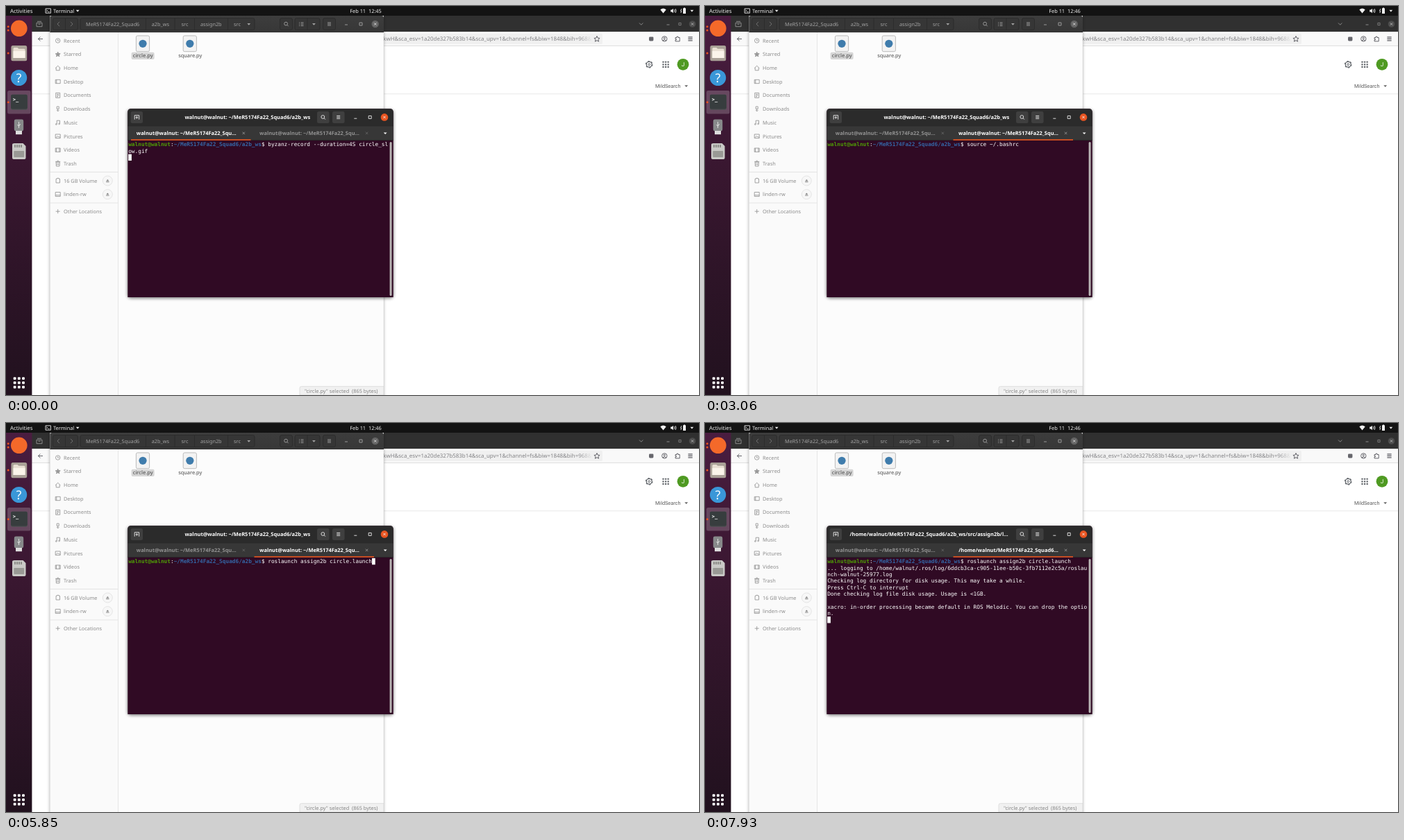
Animation, 998 px wide and 561 px high, one loop 8 s. Source, as an HTML page:

```html
<!DOCTYPE html>
<html lang="en">
<head>
<meta charset="utf-8">
<title>Desktop terminal</title>
<style>
html, body { margin: 0; width: 100%; height: 100%; overflow: hidden; background: #fff; }
svg { display: block; width: 998px; height: 561px; }
text { font: 7.4px "Noto Sans", "Open Sans", sans-serif; text-rendering: geometricPrecision; }
.mid text, text.mid { text-anchor: middle; }
.bar text { fill: #f0f0f0; }
.path text { fill: #a3a3a3; font-size: 7.3px; text-anchor: middle; }
.side text { fill: #8c8c8c; font-size: 7.35px; }
.line { fill: none; stroke-width: .9; }
.bold text { font-weight: 700; fill: #fff; font-size: 7.45px; text-anchor: middle; }
.term text { font: 7.771px "DejaVu Sans Mono", monospace; fill: #fff; }
.term .user { fill: #4e9a06; font-weight: 700; }
.term .dir { fill: #3465a4; font-weight: 700; }
</style>
</head>
<body>
<svg viewBox="0 0 998 561" xmlns="http://www.w3.org/2000/svg">
<defs>
  <linearGradient id="dock" x2="0" y2="1">
    <stop offset="0" stop-color="#4a1d40"/><stop offset=".4" stop-color="#391730"/><stop offset="1" stop-color="#21111e"/>
  </linearGradient>
  <linearGradient id="head" x2="0" y2="1">
    <stop offset="0" stop-color="#3d3d3d"/><stop offset="1" stop-color="#373737"/>
  </linearGradient>
  <linearGradient id="fade">
    <stop offset="0" stop-color="#f0f0f0" stop-opacity="0"/><stop offset="1" stop-color="#f0f0f0"/>
  </linearGradient>
  <filter id="soft" x="-10%" y="-10%" width="120%" height="120%"><feGaussianBlur stdDeviation="2.3"/></filter>
  <path id="down" d="M-2.4-1.2h4.8L0 1.5z"/>
  <path id="cross" d="M-1.7-1.7 1.7 1.7M1.7-1.7-1.7 1.7"/>
  <path id="menu" d="M-2.5-2h5M-2.5 0h5M-2.5 2h5"/>
  <path id="lens" d="M1.3 1.3 3.2 3.2M2-.4A2.4 2.4 0 1 1-2.8-.4 2.4 2.4 0 1 1 2-.4"/>
  <path id="min" d="M-2 2h4"/>
  <path id="max" d="M-2-2h4v4h-4z"/>
  <g id="grid"></g>
  <g id="eject"><circle r="7" fill="#f7f7f7" stroke="#dcdcdc" stroke-width=".7"/><path d="M-2.2.6 0-2 2.2.6zM-2.2 1.3h4.4v.9h-4.4z" fill="#858585"/></g>
  <g id="script"><rect x="-9.6" y="-11.4" width="19.2" height="22.8" rx="2" fill="#f3f3f3" stroke="#b5b5b5" stroke-width=".9"/><circle r="5.6" fill="#3f7cac"/></g>
</defs>

<!-- browser -->
<rect x="37" y="14" width="961" height="23.3" fill="#303030"/>
<rect x="37" y="37.3" width="961" height="20" fill="#f9f9f9"/>
<rect x="400" y="40" width="459" height="15" rx="2" fill="#f0f0f0"/>
<path d="M37 57.4H998" stroke="#d5d5d5" stroke-width=".8"/>
<path d="M37 126.8H998" stroke="#e9e9e9"/>
<text x="543.3" y="50.2" style="font-size:7.9px" fill="#818184">kwH&amp;sca_esv=1a20de327b583b14&amp;sca_upv=1&amp;channel=fs&amp;biw=1848&amp;bih=968&amp;</text>
<rect x="825" y="41" width="19" height="13" fill="url(#fade)"/>
<g class="line" stroke="#55555c">
  <path d="M53 47.5H46.6M49.4 44.5 46.4 47.5 49.4 50.5"/>
  <path d="M851 43.4 852.2 46.1 855.1 46.4 852.9 48.3 853.6 51.2 851 49.7 848.4 51.2 849.1 48.3 846.9 46.4 849.8 46.1z"/>
  <circle cx="948.3" cy="47.4" r="3.7"/><circle cx="948.3" cy="46.4" r="1.1"/><path d="M946 49.7q2.3-2 4.6 0"/>
  <path d="M964 45.5h2v-1.3h2v1.3h2.2v5.4H964v-2h1.3v-1.3H964z"/>
  <use href="#menu" transform="translate(985.5 47.4) scale(1.25)"/>
</g>
<rect x="926" y="44.4" width="6.4" height="6" rx="1.4" fill="#66666c"/>
<g class="line" stroke="#969696">
  <path d="M44 24.3h8v5.4h-8zM45 22.3h6M46.5 26.3h3"/>
  <path d="M912 24.5 914.7 27.2 917.4 24.5"/>
  <use href="#min" x="953.5" y="25"/><use href="#max" transform="translate(970.5 26) scale(.8)"/>
  <circle cx="988.5" cy="26" r="4.8" fill="#4c4c4c" stroke="none"/><use href="#cross" x="988.5" y="26" stroke="#bbb"/>
</g>
<g fill="none" stroke="#5f6368"><circle cx="926.2" cy="84.3" r="3.9" stroke-width="1.2"/><circle cx="926.2" cy="84.3" r="4.7" stroke-width="1.2" stroke-dasharray="2.4 2.52"/><circle cx="926.2" cy="84.3" r="1.4"/></g>
<use href="#grid" transform="translate(950 84.3) scale(.58)" fill="#5f6368"/>
<circle cx="975" cy="84.3" r="8.4" fill="#4f9a22"/>
<text class="mid" x="975" y="87.2" fill="#fff" style="font-family:Roboto,sans-serif;font-size:8.2px">J</text>
<text x="935" y="118" fill="#5a5a5a" style="font-family:Roboto,sans-serif;font-size:7.3px">MildSearch</text>
<use href="#down" x="979.7" y="115.4" fill="#666"/>

<!-- file manager -->
<rect x="62.5" y="15" width="482" height="552" opacity=".22" filter="url(#soft)"/>
<rect x="63.4" y="14" width="480.6" height="547" fill="#fcfcfc"/>
<rect x="63.4" y="38" width="98" height="523" fill="#fafafa"/>
<path d="M161.5 38V561M63.4 239.5h98M63.4 284h98" stroke="#e2e2e2" stroke-width=".9"/>
<path d="M63.2 38V561M544.2 38V561" stroke="#c6c6c6" stroke-width=".5"/>
<path d="M63.4 38V17q0-3 3-3h474.6q3 0 3 3v21z" fill="url(#head)"/>
<path d="M63.4 37.7H544" stroke="#262626" stroke-width=".5"/>
<g fill="#363636" stroke="#2a2a2a" stroke-width=".8">
  <rect x="67.5" y="17.5" width="36" height="17" rx="2.5"/><rect x="107" y="17.5" width="251" height="17" rx="2.5"/>
  <rect x="394.5" y="17.5" width="18" height="17" rx="2.5"/><rect x="416" y="17.5" width="36" height="17" rx="2.5"/>
  <rect x="456.5" y="17.5" width="18" height="17" rx="2.5"/>
  <path d="M85.5 17.5v17M201.5 17.5v17M243 17.5v17M271.5 17.5v17M319.5 17.5v17M434 17.5v17"/>
</g>
<g class="path">
  <text x="153.7" y="28.6">MeR5174Fa22_Squad6</text><text x="222.3" y="28.6">a2b_ws</text><text x="257.5" y="28.6">src</text>
  <text x="295.3" y="28.6">assign2b</text><text x="333" y="28.6">src</text>
</g>
<g fill="#a3a3a3"><use href="#down" x="349.7" y="26.2"/><use href="#down" x="443.4" y="26.2"/></g>
<g class="line" stroke="#a3a3a3">
  <path d="M77 22.8 74 26 77 29.2M93 22.8 96 26 93 29.2" stroke="#777"/>
  <use href="#lens" x="403.5" y="26"/><use href="#menu" x="465.5" y="26"/>
  <path d="M424.5 24h4M424.5 26.2h4M424.5 28.4h4M422 24h1M422 26.2h1M422 28.4h1"/>
  <use href="#min" x="490" y="25"/><use href="#max" x="511" y="26"/>
  <circle cx="531.7" cy="26" r="5.2" fill="#656565" stroke="none"/><use href="#cross" x="531.7" y="26" stroke="#e0e0e0"/>
</g>
<g class="side" id="side"></g>
<g class="line" stroke="#989898" stroke-width=".8">
  <circle cx="74.7" cy="50" r="3.2"/><path d="M74.7 48v2.2h1.6"/>
  <path d="M74.7 66.3 75.7 68.6 78.2 68.8 76.3 70.5 76.9 72.9 74.7 71.6 72.5 72.9 73.1 70.5 71.2 68.8 73.7 68.6z" fill="#989898"/>
  <path d="M71 89.8 74.7 86.2 78.4 89.8M72.2 89v3.8h5V89"/>
  <path d="M71.2 106.3h7v5.4h-7zM72.8 106.3v5.4"/>
  <path d="M71.7 125.3h6v7h-6zM73 127.3h3.4M73 129h3.4M73 130.7h2"/>
  <path d="M74.7 151.8v-3M73 150.2l1.7 1.8 1.7-1.8M73.2 148.5v-3.5h3v3.5z"/>
  <path d="M73.2 170.5v-5.3h4.3v4.5"/><circle cx="72.3" cy="170.5" r=".9"/><circle cx="76.6" cy="169.9" r=".9"/>
  <path d="M71.2 185h7v5.6h-7zM72 189.8l2-2.3 1.4 1.4 1-1 1.3 1.9"/>
  <path d="M71.2 205h7v5.4h-7zM72.6 205v5.4M76.8 205v5.4"/>
  <path d="M72 225.2h5.4l-.4 5.8h-4.6zM71.2 224.4h7M73.6 223.2h2.2M73.8 226.8v2.6M75.7 226.8v2.6"/>
  <path d="M72.1 249.4h1.2v-1h3v1h1.2v5.6h-5.4z"/><path d="M71.2 268.6h7v6h-7zM71.2 272.8h7"/>
  <path d="M71.7 296.2h6M74.7 293.2v6"/>
</g>
<use href="#eject" x="146.3" y="252"/><use href="#eject" x="146.3" y="271.6"/>
<use href="#script" x="197" y="54.3"/><use href="#script" x="264.8" y="54.3"/>
<rect x="180.6" y="66.7" width="33" height="10.4" rx="2" fill="#d6d6d6"/>
<g class="mid" fill="#484848"><text x="197.2" y="74.4" style="font-size:7.6px">circle.py</text><text x="265.2" y="74.4">square.py</text></g>
<path d="M423 561V551q0-2.3 2.3-2.3H544V561z" fill="#f1f1f1" stroke="#d8d8d8" stroke-width=".8"/>
<text x="430" y="557.8" fill="#858585" style="font-size:7.35px">"circle.py" selected&#160; (865 bytes)</text>

<!-- dock -->
<rect y="14" width="37.4" height="547" fill="url(#dock)"/>
<rect x="2" y="122" width="33.5" height="33.5" rx="2.5" fill="#fff" opacity=".2"/>
<g fill="#e95420"><circle cx="3.2" cy="29.8" r="1.5"/><circle cx="3.2" cy="35" r="1.5"/><circle cx="3.2" cy="68" r="1.5"/><circle cx="3.2" cy="138.8" r="1.5"/></g>
<circle cx="18.8" cy="32.3" r="11.8" fill="#f4692a"/>
<rect x="7.4" y="57" width="22.8" height="22.2" rx="2.5" fill="#aaa197"/>
<path d="M10.5 61.5q0-1.5 1.5-1.5h4.5l1.8 1.8H26q1.5 0 1.5 1.5V75h-17z" fill="#e9dfd3"/><path d="M10.5 65h17v10h-17z" fill="#fbf4ea"/>
<circle cx="18.6" cy="103.5" r="11.6" fill="#3a97d8"/>
<text class="mid" x="18.6" y="109.8" fill="#fff" style="font-size:17.5px">?</text>
<rect x="7" y="127.8" width="23.8" height="22" rx="2.2" fill="#4b4f50"/><rect x="7" y="127.8" width="23.8" height="20.6" rx="2.2" fill="#373d3e"/>
<text x="9.8" y="136.6" fill="#fff" style="font:bold 7px 'DejaVu Sans Mono',monospace">&gt;_</text>
<rect x="11.8" y="163.5" width="13.4" height="17" rx="2.4" fill="#87898a"/><rect x="14" y="180" width="9" height="5.2" fill="#dedede"/>
<path d="M18.5 167v9M16.3 171l2.2 2.5 2.2-3.5" class="line" stroke="#e4e4e4"/>
<path d="M12 198h12.5l4 4v17q0 2-2 2H11q-2 0-2-2v-19q0-2 3-2z" fill="#c9c9c6"/><rect x="11.3" y="209" width="14.8" height="9" rx="1" fill="#999995"/>
<path d="M13 200v4M16 200v4M19 200v4M22 200v4" stroke="#74746f" stroke-width="1.4"/>
<use href="#grid" x="18.7" y="543.3" fill="#fff"/>

<!-- top bar -->
<rect width="998" height="14" fill="#131313"/>
<g class="bar">
  <text x="6" y="9.7" style="font-size:7.8px">Activities</text><text x="68" y="9.7">Terminal</text>
  <text class="mid" id="clock" x="518" y="9.7"></text>
</g>
<path d="M57 3.8h7.4v6.4H57zM58.3 5.6l1.5 1.3-1.5 1.3M60.6 8.4h2" class="line" stroke="#e8e8e8"/>
<g fill="#f0f0f0">
  <use href="#down" x="103.2" y="7"/><use href="#down" x="987.8" y="7"/>
  <path d="M942.3 5.3q4.2-3.4 8.4 0L946.5 10.6z"/>
  <path d="M957.2 5.6h1.7l2-1.9v6.6l-2-1.9h-1.7z"/><path d="M962.4 5.2q1.2 1.8 0 3.6M964 4q2 3 0 6" class="line" stroke="#f0f0f0"/>
  <path d="M975 3.3h1v-.9h2v.9h1v7.6h-4z"/><path d="M972.8 4 971.5 7.2h1.3L971.8 10" class="line" stroke="#f0f0f0"/>
</g>

<!-- terminal -->
<rect x="174.8" y="149.4" width="383.4" height="272.4" rx="5" opacity=".5" filter="url(#soft)"/>
<path d="M175.3 420V153q0-4.7 4.7-4.7h373q4.7 0 4.7 4.7V420z" fill="#300a24"/>
<path d="M175.3 173V153q0-4.7 4.7-4.7h373q4.7 0 4.7 4.7v20z" fill="#2b2b2b"/>
<rect x="175.3" y="172.6" width="382.4" height="21.3" fill="#373737"/>
<path d="M175.3 172.8h382.4M175.3 193.6h382.4" stroke="#202020" stroke-width=".6"/>
<g fill="#3f3f3f"><rect x="179.6" y="152" width="17.4" height="17" rx="2.5"/><rect x="448" y="152" width="17.6" height="17" rx="2.5"/><rect x="470" y="152" width="17.6" height="17" rx="2.5"/></g>
<g class="line" stroke="#ececec">
  <path d="M185.2 163.7v-6h6.4v6M188.4 158.8v4M186.6 160.8h3.6"/>
  <use href="#lens" x="456.7" y="160.4"/><use href="#menu" x="478.7" y="160.4"/>
  <use href="#min" x="503.3" y="160.2"/><use href="#max" x="524.2" y="160.4"/>
  <circle cx="545" cy="160.4" r="5.3" fill="#e95420" stroke="none"/><use href="#cross" x="545" y="160.4"/>
</g>
<use href="#down" x="546.2" y="183.6" fill="#fff"/>
<g class="bold">
  <text id="title" y="163"></text>
  <text class="tab" x="259.7" y="186"></text><text class="tab" x="437" y="186"></text>
</g>
<g class="line" stroke="#9a9a9a"><use class="shut" href="#cross" x="342.3" y="183.4"/><use class="shut" href="#cross" x="519.6" y="183.4"/></g>
<rect id="mark" y="192.2" width="172.5" height="1.6" fill="#e95420"/>
<rect x="552.6" y="196" width="3" height="222" rx="1.5" fill="#b9b4b4"/>
<g class="term" id="term">
  <text x="176.2" y="202.2"><tspan class="user">walnut@walnut</tspan>:<tspan class="dir">~/MeR5174Fa22_Squad6/a2b_ws</tspan>$</text>
  <rect id="caret" width="4.68" height="9.36" fill="#fff"/>
</g>
</svg>
<script>
const LOOP = 8000, COLS = 80, CELL = 4.678, ROW = 9.356, LEFT = 176.2, TOP = 194.93, PROMPT = 43;
const NS = "http://www.w3.org/2000/svg";
const $ = id => document.getElementById(id);
const all = name => [...document.querySelectorAll(name)];

function add(parent, tag, attrs, text = "") {
  const el = document.createElementNS(NS, tag);
  for (const key in attrs) el.setAttribute(key, attrs[key]);
  el.textContent = text;
  return parent.appendChild(el);
}

for (let i = 0; i < 9; i++)
  add($("grid"), "rect", { x: i % 3 * 6.2 - 8, y: (i / 3 | 0) * 6.2 - 8, width: 3.8, height: 3.8, rx: 1 });

["Recent", "Starred", "Home", "Desktop", "Documents", "Downloads", "Music", "Pictures", "Videos", "Trash"]
  .forEach((name, i) => add($("side"), "text", { x: 83, y: 52.5 + i * 19.72 }, name));
[["16 GB Volume", 254.6], ["linden-rw", 274.2], ["Other Locations", 298.8]]
  .forEach(([name, y]) => add($("side"), "text", { x: 83, y }, name));

const record = "byzanz-record --duration=4S circle_slow.gif\n";
const source = "source ~/.bashrc";
const launch = "roslaunch assign2b circle.launch";
const log = launch + `
... logging to /home/walnut/.ros/log/6ddcb3ca-c905-11ee-b50c-3fb7112e2c5a/roslaunch-walnut-25977.log
Checking log directory for disk usage. This may take a while.
Press Ctrl-C to interrupt
Done checking log file disk usage. Usage is <1GB.

`;
const notice = "xacro: in-order processing became default in ROS Melodic. You can drop the option.\n";

// [start, text after the prompt, caret visible]
const steps = [
  [0, record, 1], [510, record, 0],
  [1020, "", 1], [1620, "", 0], [1870, "", 1], [1930, "clear", 1],
  [2530, source, 1], [3060, source, 0], [3540, source, 1], [3590, "source .bashrc", 1],
  [3920, "gedit ~/.bashrc", 1], [4060, launch, 1], [4220, "catkin_make", 1],
  [4720, launch, 1], [5250, launch, 0], [5850, launch, 1], [6440, launch, 0], [7050, launch, 1],
  [7490, launch + "\n", 1], [7660, log, 1], [7930, log + notice, 1]
];

const shell = "walnut@walnut: ~/MeR5174Fa22_Squ…";
const rows = Array.from({ length: 10 }, (_, i) =>
  add($("term"), "text", { x: LEFT, y: 202.2 + i * ROW }));

function wrap(text) {
  return text.split("\n").flatMap(line => line.match(new RegExp(`.{1,${COLS}}`, "g")) || [""]);
}

function show([start, text, caret]) {
  const active = start < 1020 ? 0 : 1, running = start >= 7660;
  const lines = wrap("\u00a0".repeat(PROMPT) + text);
  rows.forEach((row, i) => row.textContent = lines[i] || "");
  const last = lines.length - 1;
  $("caret").setAttribute("x", LEFT + lines[last].length * CELL);
  $("caret").setAttribute("y", TOP + last * ROW);
  $("caret").style.opacity = caret;
  $("title").setAttribute("x", running ? 322.5 : 347.8);
  $("title").textContent = running
    ? "/home/walnut/MeR5174Fa22_Squad6/a2b_ws/src/assign2b/l…"
    : "walnut@walnut: ~/MeR5174Fa22_Squad6/a2b_ws";
  all(".tab").forEach((tab, i) => {
    tab.textContent = i && running ? "/home/walnut/MeR5174Fa22_Squad6…" : shell;
    tab.style.fill = i === active ? "#fff" : "#929292";
  });
  all(".shut").forEach((x, i) => x.style.opacity = i === active ? 1 : .45);
  $("mark").setAttribute("x", active ? 357.5 : 180);
}

let current;
function tick() {
  const t = performance.now() % LOOP;
  const step = steps.findLast(s => s[0] <= t);
  if (step !== current) show(current = step);
  $("clock").textContent = "Feb 11\u00a0 12:" + (t < 2650 ? 45 : 46);
  requestAnimationFrame(tick);
}
tick();
</script>
</body>
</html>
```
